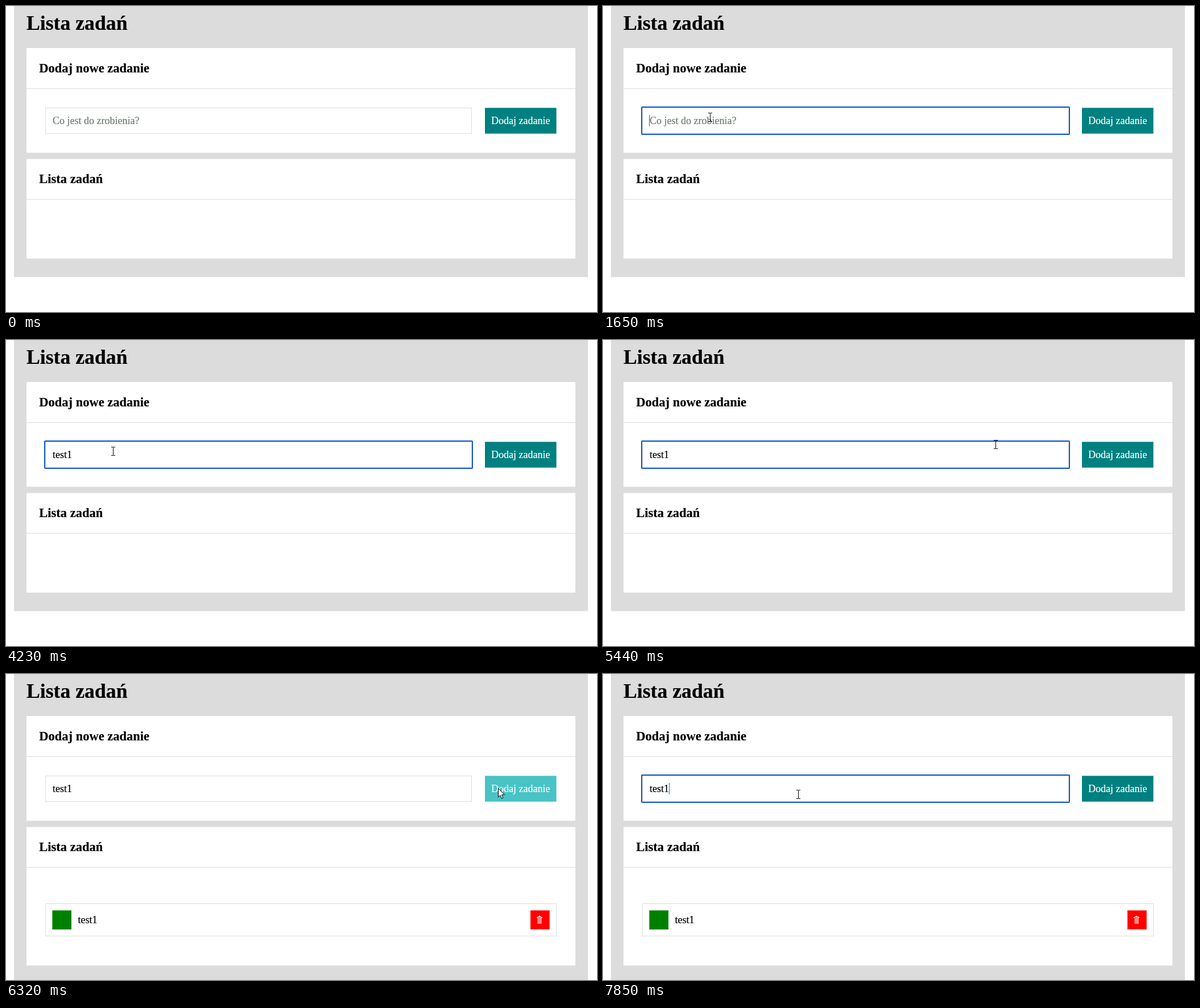
Animation of 1039x539 px, one loop 8 s. Source, as an HTML page:

```html
<!DOCTYPE html>
<html lang="pl">
<head>
<meta charset="utf-8">
<title>Lista zadań</title>
<style>
  html, body { margin: 0; width: 100%; height: 100%; overflow: hidden; background: #fff; }
  svg { display: block; width: 100%; height: 100%; }
  text { font: 18px "Liberation Serif", "Times New Roman", serif; stroke: #000; stroke-width: .2; }
  .title { font-size: 35.7px; font-weight: bold; }
  .heading { font-size: 22.5px; font-weight: bold; }
  .white { fill: #fff; }
  text.white { stroke: #fff; }
  .grey { fill: #dcdcdc; }
  .box { fill: #fff; stroke: #dcdcdc; }
  .line { fill: none; stroke: #000; }
</style>
</head>
<body>
<svg viewBox="0 0 1039 539">
  <rect id="page" class="grey" x="14" width="1009" height="477.5"/>
  <text class="title" x="36" y="42">Lista zadań</text>

  <rect class="white" x="36" y="74" width="965" height="184.5"/>
  <text class="heading" x="58.3" y="117">Dodaj nowe zadanie</text>
  <rect class="grey" x="36" y="145" width="965" height="1"/>
  <rect class="box" x="69.5" y="179.5" width="749" height="45"/>
  <rect id="ring" x="68" y="178" width="752" height="48" rx="1" fill="none" stroke="#0f55cf" stroke-width="2"/>
  <text id="placeholder" x="82" y="208" style="fill: #6d7b6f; stroke: #6d7b6f">Co jest do zrobienia?</text>
  <text id="typed" x="82" y="208"></text>
  <rect id="caret" y="192" width="1" height="20" fill="#1467cf"/>
  <rect id="button" x="842" y="179.4" width="125.6" height="45.4"/>
  <text class="white" x="853" y="208">Dodaj zadanie</text>

  <rect id="list" class="white" x="36" y="269.5" width="965" height="175.5"/>
  <text class="heading" x="58.3" y="312">Lista zadań</text>
  <rect class="grey" x="36" y="340" width="965" height="1"/>
  <g id="task">
    <rect class="box" x="69.5" y="404.5" width="898" height="57"/>
    <rect x="81.4" y="416.4" width="33.6" height="33.6" fill="#008000"/>
    <text x="126.5" y="439">test1</text>
    <rect x="922" y="416.4" width="33.7" height="33.4" fill="#f00"/>
    <path d="M933 429.5L938 426.5L943 429.5M935.5 429V440M938 427V440M940.5 429V440" fill="none" stroke="#fff" stroke-width="1.3"/>
  </g>

  <g id="cursor">
    <path id="arrow" d="M.5 .5V16L4 12.7L6.3 18.2L8.8 17.1L6.5 11.8H11.4Z" fill="#fff" stroke="#000"/>
    <path id="beam" class="line" d="M-3 -7.5H0L.5 -7L1 -7.5H4M.5 -7V7M-3 7.5H0L.5 7L1 7.5H4"/>
    <circle id="press" r="15" fill="#ff0" fill-opacity=".55"/>
  </g>
</svg>
<script>
const LOOP = 8000, STEP = 70, BLINK = 530, PRESS = 130;
const WORD = 'test1', FIRST_KEY = 2310, KEY_PACE = 120;
const FOCUS = 1580, SUBMIT = 6190, REFOCUS = 7720;
const HOVER_IN = 5740, HOVER_OUT = 6830, HOVER_FADE = 240;
const clicks = [FOCUS - STEP, SUBMIT, REFOCUS];

// Each pointer stroke is a curve bent towards one control point.
const offstage = [1497, 834], inField = [235, 189], inText = [188, 196];
const nearButton = [835, 203], onButton = [865, 201], backInField = [343, 212];
const middle = (a, b) => a.map((v, i) => (v + b[i]) / 2);
const strokes = [
  { start: 290, length: 140, from: offstage, bend: middle(offstage, inField), to: inField },
  { start: 710, length: 530, from: inField, bend: [148, 117], to: inText },
  { start: 4960, length: 750, from: inText, bend: [88, 100], to: nearButton },
  { start: 5770, length: 140, from: nearButton, bend: middle(nearButton, onButton), to: onButton },
  { start: 6790, length: 660, from: onButton, bend: [343, 250], to: backInField }
];

const $ = id => document.getElementById(id);
const set = (id, name, value) => $(id).setAttribute(name, value);
const show = (id, on) => set(id, 'visibility', on ? 'visible' : 'hidden');
const clamp = v => Math.max(0, Math.min(1, v));
const mix = (a, b, u) => a + (b - a) * u;
const easeOut = u => 1 - (1 - u) ** 2.5;

function pointerAt(t) {
  const stroke = strokes.findLast(s => t >= s.start);
  if (!stroke) return offstage;
  const { start, length, from, bend, to } = stroke;
  const elapsed = (Math.floor((t - start) / STEP) + 1) * STEP;
  const u = easeOut(clamp(elapsed / (length + STEP)));
  return from.map((v, i) => Math.round(mix(mix(v, bend[i], u), mix(bend[i], to[i], u), u)));
}

// The pauses between keys grow steadily.
function typedAt(t) {
  if (t < FIRST_KEY) return '';
  return WORD.slice(0, 1 + Math.floor(Math.sqrt((t - FIRST_KEY) / KEY_PACE)));
}

function drawField(t) {
  const text = typedAt(t);
  const focused = t >= FOCUS && t < SUBMIT || t >= REFOCUS;
  const focusTime = t - (t >= REFOCUS ? REFOCUS : FOCUS);
  $('typed').textContent = text;
  show('placeholder', !text);
  show('ring', focused);
  show('caret', focused && Math.floor(focusTime / BLINK) % 2 === 0);
  set('caret', 'x', text ? Math.round(82 + $('typed').getComputedTextLength()) : 81);
}

function drawButton(t) {
  const hover = clamp((t - HOVER_IN) / HOVER_FADE) - clamp((t - HOVER_OUT) / HOVER_FADE);
  set('button', 'fill', `rgb(${mix(0, 72, hover)} ${mix(128, 195, hover)} ${mix(128, 198, hover)})`);
}

function drawList(t) {
  const added = t >= SUBMIT + PRESS;
  show('task', added);
  set('list', 'height', added ? 244 : 175.5);
  set('page', 'height', added ? 539 : 477.5);
}

function drawPointer(t) {
  const [x, y] = pointerAt(t);
  const overField = x > 69 && x < 819 && y > 178 && y < 226;
  set('cursor', 'transform', `translate(${x} ${y})`);
  show('beam', overField);
  show('arrow', !overField);
  show('press', clicks.some(c => t >= c && t < c + PRESS));
}

function frame() {
  const t = performance.now() % LOOP;
  drawField(t);
  drawButton(t);
  drawList(t);
  drawPointer(t);
  requestAnimationFrame(frame);
}
frame();
</script>
</body>
</html>
```
